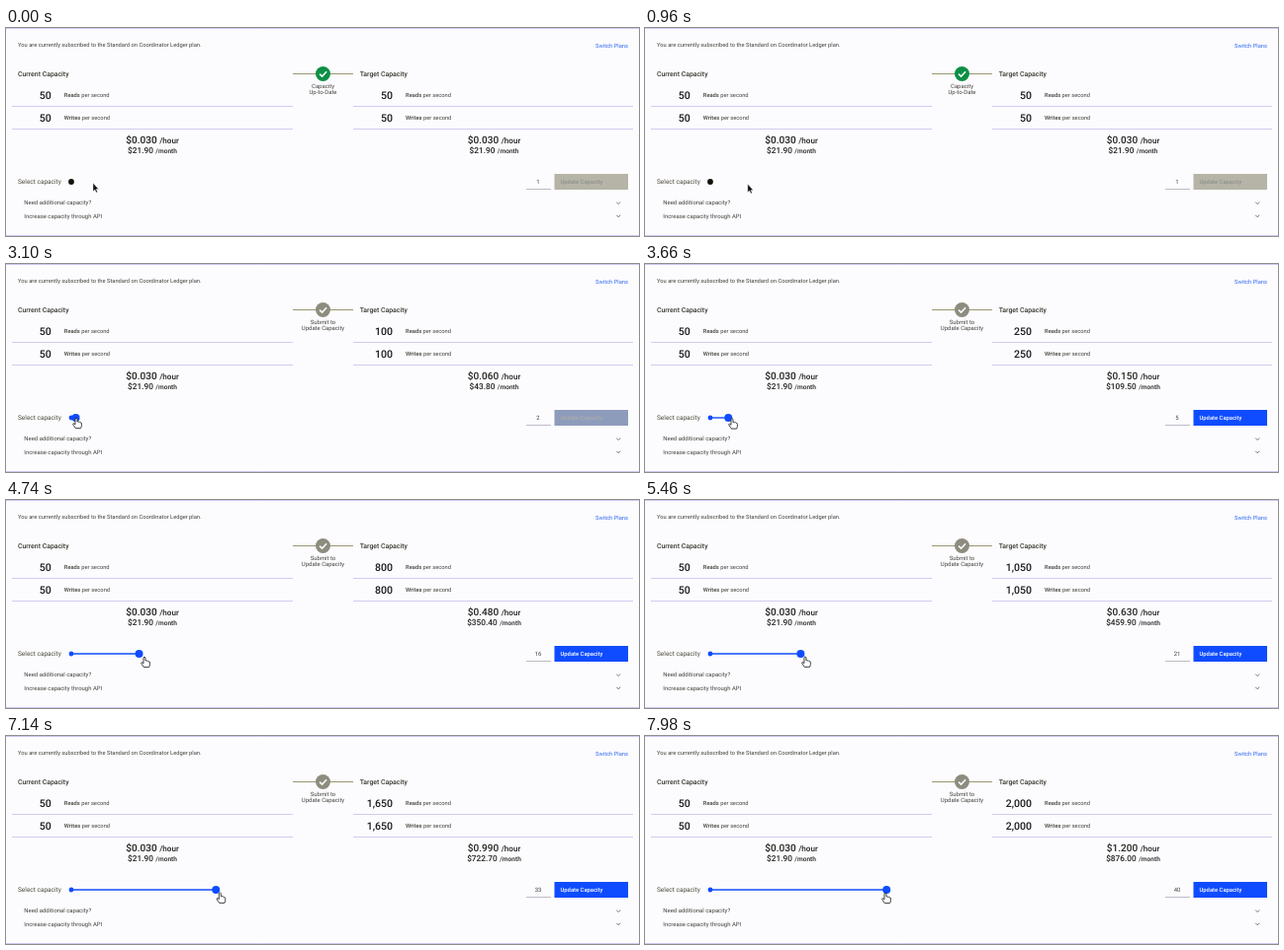
Animation of 640x211 px, one loop 8 s. Source, as an HTML page:

```html
<!DOCTYPE html>
<html lang="en">
<head>
<meta charset="utf-8">
<title>Capacity slider</title>
<style>
  html, body { margin: 0; width: 100%; height: 100%; overflow: hidden; background: #fcfbfe; }
  svg { display: block; width: 640px; height: 211px; }
  text { font-family: Roboto, Inter, sans-serif; font-size: 5.75px; fill: #45433c; text-rendering: geometricPrecision; white-space: pre; }
  .mid { text-anchor: middle; }
  .end { text-anchor: end; }
  .strong { font-weight: 500; }
  .title { font-size: 6.9px; font-weight: 500; fill: #37362c; }
  .count { font-size: 10.6px; font-weight: 500; fill: #1c1c1c; }
  .price { font-weight: 500; fill: #24231f; }
  .row { font-size: 5.95px; }
  .rule { stroke: #cfcdf2; stroke-width: 1; }
</style>
</head>
<body>
<svg id="stage" viewBox="0 0 640 211">
  <rect width="640" height="211" fill="#fcfbfe"/>
  <path class="rule" d="M0 .5H640M0 210.5H640M6 79.5H290M6 102.5H290M351 79.5H634M351 102.5H634"/>
  <text x="12" y="19.3">You are currently subscribed to the Standard on Coordinator Ledger plan.</text>
  <text class="end" x="629" y="19.5" style="fill:#2f6bf2">Switch Plans</text>

  <path d="M290 46.5H351" stroke="#99986f"/>
  <circle id="badge" cx="320.5" cy="46.5" r="7.5"/>
  <path d="M317.1 46.6l2.5 2.5 4.5-4.8" fill="none" stroke="#fff" stroke-width="1.5"/>
  <text class="mid row" id="status1" x="320.5" y="61.4"/>
  <text class="mid row" id="status2" x="320.5" y="67.2"/>

  <g id="panels"></g>

  <text x="12" y="158.3" style="font-size:6.5px;fill:#4d4b38">Select capacity</text>
  <path id="track" stroke="#0f4cff" stroke-width="1.4"/>
  <circle id="origin" cx="66" cy="156" r="2.4" fill="#0f4cff"/>
  <circle id="handle" cy="156"/>

  <text class="mid row" id="units" x="538" y="158"/>
  <path d="M526 163.5H551" stroke="#bdbcc8"/>
  <rect id="button" x="554.5" y="148" width="74.5" height="16"/>
  <text id="buttonText" class="strong" x="560.5" y="158.2" style="font-size:5.85px">Update Capacity</text>

  <text class="row" x="18.3" y="179.3">Need additional capacity?</text>
  <text class="row" x="18.3" y="192.6">Increase capacity through API</text>
  <path d="M617.2 176.6l2 2 2-2M617.2 189.8l2 2 2-2" fill="none" stroke="#55534a" stroke-width=".8"/>

  <path id="arrow" d="M0 0V8.4L1.9 6.7 3.2 9.6 4.5 9 3.2 6.2H5.6Z" fill="#111" stroke="#fff" stroke-width=".4"/>
  <path id="hand" d="M-1 .9Q0-.6 1 .9V4Q2 3.4 2.7 4.3 3.7 3.8 4.2 4.8 5.4 4.6 5.4 6V7.8Q5.4 9 4.6 10.6H-.7Q-1.6 9-3 7.2-3.7 6-2.7 5.6L-1 6.8Z"
        fill="#fff" stroke="#2b2b2b" stroke-width=".9" stroke-linejoin="round"/>
</svg>
<script>
const DURATION = 8000;
const $ = id => document.getElementById(id);

// Step at which each value is reached; linear in between.
const CURSOR = [
  [0, 88, 157.3], [13, 110, 159], [17, 110, 159], [34, 75, 155], [38, 73.5, 154],
  [52, 68, 156], [61, 68, 156], [67, 71, 156], [79, 88, 156.5],
  [101, 140, 159], [136, 188, 158.5], [169, 243, 159]
];
const UNITS = [[65, 1], [67, 2], [79, 5], [101, 16], [136, 27], [171, 40]];
const HOVER_STEP = 44, PRESS_STEP = 53;
const GREY = [181, 180, 166], BLUE = [15, 76, 255];

function sample(keys, at) {
  const next = keys.findIndex(key => key[0] > at);
  if (next === 0) return keys[0].slice(1);
  if (next < 0) return keys[keys.length - 1].slice(1);
  const [a, b] = [keys[next - 1], keys[next]];
  const k = (at - a[0]) / (b[0] - a[0]);
  return a.slice(1).map((v, i) => v + (b[i + 1] - v) * k);
}

// The motion advances in groups of three steps lasting 20, 20 and 100 ms.
function groupSteps(ms) {
  const rest = ms % 140;
  return 3 * Math.floor(ms / 140) + (rest < 20 ? 0 : rest < 40 ? 1 : 2);
}
const stepAt = ms => ms < 1660 ? Math.min(34, groupSteps(ms)) : 35 + groupSteps(ms - 1660);

const mix = (a, b, k) => `rgb(${a.map((v, i) => Math.round(v + (b[i] - v) * k))})`;

function buildPanel(name, title, x, titleX, centre) {
  const row = (id, label, y) => `
    <text class="count end" id="${name}${id}" x="${x + 39.8}" y="${y + 3.7}"/>
    <text x="${x + 52.8}" y="${y + 2}"><tspan class="strong">${label}</tspan> per second</text>`;
  const price = (id, per, y, size, perSize) => `
    <text class="price mid" x="${centre}" y="${y}"><tspan id="${name}${id}" style="font-size:${size}px"></tspan><tspan
      dx="2.4" style="font-size:${perSize}px">/${per}</tspan></text>`;
  return `<text class="title" x="${titleX}" y="49">${title}</text>`
    + row('Reads', 'Reads', 68) + row('Writes', 'Writes', 91)
    + price('Hour', 'hour', 117, 10.1, 8.1) + price('Month', 'month', 126.8, 8.3, 6.6);
}

function setPanel(name, units) {
  const rate = (units * 50).toLocaleString('en-US');
  $(name + 'Reads').textContent = rate;
  $(name + 'Writes').textContent = rate;
  $(name + 'Hour').textContent = '$' + (units * 0.03).toFixed(3);
  $(name + 'Month').textContent = '$' + (units * 21.9).toFixed(2);
}

function render(ms) {
  const step = stepAt(ms);
  const units = Math.round(sample(UNITS, step)[0]);
  const changed = units > 1;
  const pressed = step >= PRESS_STEP;
  const handleX = 66 + (units - 1) * 4.57;

  setPanel('target', units);
  $('units').textContent = units;
  $('status1').textContent = changed ? 'Submit to' : 'Capacity';
  $('status2').textContent = changed ? 'Update Capacity' : 'Up-to-Date';
  $('badge').setAttribute('fill', changed ? '#8d8c7e' : '#0c8f45');

  $('track').setAttribute('d', `M66 156H${handleX}`);
  $('origin').setAttribute('visibility', changed ? 'visible' : 'hidden');
  $('handle').setAttribute('cx', handleX);
  $('handle').setAttribute('r', pressed ? 4 : 2.9);
  $('handle').setAttribute('fill', pressed ? '#0f4cff' : '#12120c');

  const active = Math.max(0, Math.min(1, (step - 66.3) / 3));
  $('button').setAttribute('fill', mix(GREY, BLUE, active));
  $('buttonText').style.fill = mix([145, 146, 146], [255, 255, 255], active);

  const [x, y] = sample(CURSOR, step);
  const hovering = step >= HOVER_STEP;
  for (const [id, shown] of [['arrow', !hovering], ['hand', hovering]]) {
    $(id).setAttribute('transform', `translate(${x} ${y})`);
    $(id).setAttribute('visibility', shown ? 'visible' : 'hidden');
  }
}

$('panels').innerHTML = buildPanel('current', 'Current Capacity', 6, 12, 148)
  + buildPanel('target', 'Target Capacity', 351.3, 357.7, 493.5);
setPanel('current', 1);

const start = performance.now();
function tick() {
  render((performance.now() - start) % DURATION);
  requestAnimationFrame(tick);
}
tick();
</script>
</body>
</html>
```
